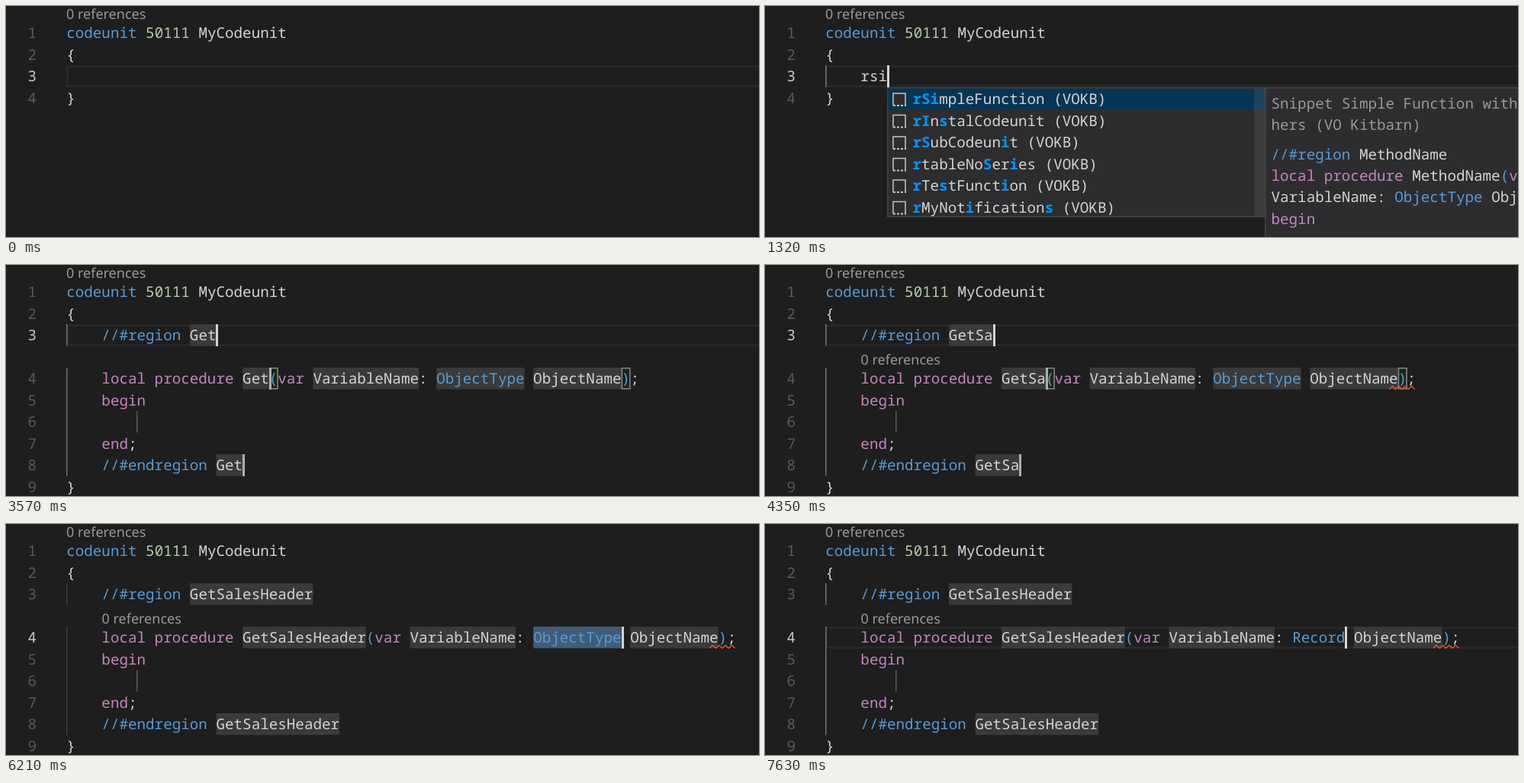
Write an HTML page that moves like this. It is 987 by 304 pixels and loops after 8000 ms.

```html
<!DOCTYPE html>
<html lang="en">
<head>
<meta charset="utf-8">
<title>Snippet typing</title>
<style>
  html, body { margin: 0; width: 100%; height: 100%; overflow: hidden; background: #1e1e1e; }
  svg { display: block; width: 987px; height: 304px; }
  text {
    font: 500 19.24px "Noto Sans Mono", "DejaVu Sans Mono", monospace;
    white-space: pre;
    text-rendering: geometricPrecision;
  }
  .lens { font: 18px "Noto Sans", "Open Sans", sans-serif; }
  .hit { fill: #0097fb; font-weight: 700; }
</style>
</head>
<body>
<svg id="stage" viewBox="0 0 987 304"></svg>
<script>
const LOOP = 8000, LEFT = 79.2, CHAR = 11.546, ROW = 28.5;
const TEXT = '#d4d4d4', BLUE = '#569cd6', PURPLE = '#c586c0', GREEN = '#b5cea8';
const GREY = '#999999', BOX = '#3a3a3a', SELECTED = '#405c79';
const PANEL = '#2d2d30', BORDER = 'stroke="#454545" stroke-width="1.5"';

const snippets = ['rSimpleFunction', 'rInstalCodeunit', 'rSubCodeunit',
  'rtableNoSeries', 'rTestFunction', 'rMyNotifications'];
const types = ['Record', 'RecordId', 'RecordRef', 'Report', 'ReportFormat', 'RequestPage'];

// Each step changes only the listed properties of the editor state.
const steps = [
  [0, { word: '', popup: false, cursor: false, inserted: false, gap: false, lens: false,
        name: 'MethodName', type: 'ObjectType', field: 'name', selected: false }],
  [230, { word: 'r', cursor: true }],
  [320, { popup: true }],
  [780, { word: 'rs' }],
  [1010, { word: 'rsi' }],
  [1380, { word: 'rsim' }],
  [1870, { cursor: false }],
  [2100, { inserted: true, popup: false, selected: true, cursor: true }],
  [2560, { gap: true, cursor: false }],
  [3110, { cursor: true }],
  [3190, { name: 'G', selected: false }],
  [3420, { name: 'Ge' }],
  [3570, { name: 'Get' }],
  [3800, { lens: true }],
  [4120, { name: 'GetS' }],
  [4350, { name: 'GetSa' }],
  [4500, { name: 'GetSal' }],
  [4580, { name: 'GetSale' }],
  [4740, { name: 'GetSales' }],
  [5050, { name: 'GetSalesH' }],
  [5200, { name: 'GetSalesHe' }],
  [5430, { name: 'GetSalesHea' }],
  [5600, { name: 'GetSalesHead' }],
  [5830, { name: 'GetSalesHeade' }],
  [5980, { name: 'GetSalesHeader' }],
  [6210, { field: 'type', selected: true }],
  [6670, { cursor: false }],
  [6990, { type: 'R', selected: false, cursor: true }],
  [7070, { popup: true }],
  [7220, { type: 'Re' }],
  [7370, { type: 'Rec' }],
  [7460, { type: 'Reco' }],
  [7630, { type: 'Record', popup: false }]
];

const colX = col => LEFT + col * CHAR;
const rect = (x, y, w, h, fill, extra = '') =>
  `<rect x="${x}" y="${y}" width="${w}" height="${h}" fill="${fill}" ${extra}/>`;
const text = (x, y, content, fill, cls = '') =>
  `<text x="${x}" y="${y}" fill="${fill}" class="${cls}">${content}</text>`;

function tokens(x, y, list) {
  let col = 0;
  return list.map(([content, fill]) => {
    const out = text(x + col * CHAR, y, content, fill);
    col += content.length;
    return out;
  }).join('');
}

function label(item, query) {
  const hits = new Set([...query.toLowerCase()].map(c => item.toLowerCase().indexOf(c)));
  return [...item].map((c, i) => hits.has(i) ? `<tspan class="hit">${c}</tspan>` : c).join('');
}

function matches(item, query) {
  const rest = [...item.toLowerCase()];
  return [...query.toLowerCase()].every(c => {
    const i = rest.indexOf(c);
    if (i >= 0) rest.splice(i, 1);
    return i >= 0;
  });
}

function suggestList(x, y, width, items, query, suffix) {
  const height = items.length * ROW - 1.5;
  let out = rect(x + .75, y + .75, width, height, PANEL, BORDER);
  out += rect(x + 1.5, y + 1.5, width - 1.5, ROW - 1, '#073655');
  if (items.length > 5) out += rect(x + width - 14, y + 1.5, 14, height - 1.5, 'rgba(121,121,121,.2)');
  items.forEach((item, i) => {
    const top = y + 1 + i * ROW, ix = x + 8, iy = top + 7;
    out += `<path d="M${ix} ${iy + 16}V${iy}H${ix + 16}V${iy + 16}" fill="${PANEL}" stroke="#c5c5c5" stroke-width="1.5"/>`;
    out += `<path d="M${ix} ${iy + 16}h17" stroke="#c5c5c5" stroke-width="2" stroke-dasharray="3 2"/>`;
    out += text(x + 33.5, top + 21, label(item, query) + suffix, TEXT);
  });
  return out;
}

function details(x, y) {
  const lines = [
    [28, [['Snippet Simple Function with ot', GREY]]],
    [56, [['hers (VO Kitbarn)', GREY]]],
    [95, [['//#region ', BLUE], ['MethodName', TEXT]]],
    [123, [['local procedure ', PURPLE], ['MethodName', TEXT], ['(', BLUE], ['var', PURPLE]]],
    [151, [['VariableName: ', TEXT], ['ObjectType ', BLUE], ['ObjectName);', TEXT]]],
    [180, [['begin', PURPLE]]]
  ];
  return rect(x + .75, y + .75, 370, 230, PANEL, BORDER) +
    lines.map(([dy, list]) => tokens(x + 8.5, y + dy, list)).join('');
}

function squiggle(x, y) {
  let d = `M${x} ${y}`;
  for (let i = 1; i <= 8; i++) d += `L${x + i * 4.2} ${y - (i % 2) * 4}`;
  return `<path d="${d}" fill="none" stroke="#e2533f" stroke-width="1.5" stroke-linejoin="round"/>`;
}

function codeLines(s) {
  const head = [
    [['codeunit', BLUE], [' ', TEXT], ['50111', GREEN], [' MyCodeunit', TEXT]],
    [['{', TEXT]]
  ];
  if (!s.inserted) return [...head, [['    ' + s.word, TEXT]], [['}', TEXT]]];
  return [...head,
    [['    //#region ', BLUE], [s.name, TEXT]],
    [['    local procedure ', PURPLE], [s.name, TEXT], ['(', BLUE], ['var ', PURPLE],
      ['VariableName: ', TEXT], [s.type, BLUE], [' ObjectName', TEXT], [')', BLUE], [';', TEXT]],
    [['    begin', PURPLE]],
    [],
    [['    end', PURPLE], [';', TEXT]],
    [['    //#endregion ', BLUE], [s.name, TEXT]],
    [['}', TEXT]]
  ];
}

function draw(s) {
  const top = row => 21 + ROW * (row + (s.gap && row >= 3 ? 1 : 0));
  const bar = (row, col, fill) => rect(Math.round(colX(col)), Math.round(top(row)), 3, 29, fill);
  const box = (row, col, len, fill) =>
    rect(colX(col), Math.round(top(row)), len * CHAR, 28.5, fill, 'rx="1.5"');
  const onName = s.field === 'name';
  const active = onName ? 2 : 3;
  const paren = 20 + s.name.length;
  const typeCol = paren + 19;
  const typeEnd = typeCol + s.type.length;
  const close = typeEnd + 11;
  const nameSpots = [[2, 14], [3, 20], [7, 17]];
  const guide = s.selected ? '#404040' : '#707070';
  let out = rect(0, 0, 987, 304, '#1e1e1e');

  if (!s.selected)
    out += rect(80.5, top(active) + 1.5, 920, 26, 'none', 'stroke="#282828" stroke-width="3"');
  if (s.inserted || s.word) out += rect(79, 78, 1.5, ROW, guide);

  if (s.inserted) {
    out += rect(79, top(3), 1.5, 5 * ROW, guide);
    out += rect(171, top(5), 1.5, ROW, '#5a5a5a');
    for (const [row, col] of nameSpots)
      out += box(row, col, s.name.length, onName && s.selected ? SELECTED : BOX);
    out += box(3, paren + 5, 12, BOX) + box(3, typeEnd + 1, 10, BOX);
    if (onName || s.selected) out += box(3, typeCol, s.type.length, onName ? BOX : SELECTED);
    if (onName && !s.selected)
      for (const col of [paren, close])
        out += rect(colX(col) + .75, top(3) + .75, CHAR - 1, 27, 'rgba(0,100,0,.1)',
          'stroke="#888" stroke-width="1.5"');
  }

  out += text(79, 17, '0 references', GREY, 'lens');
  if (s.lens) out += text(125.5, 131, '0 references', GREY, 'lens');

  codeLines(s).forEach((line, row) => {
    const y = top(row) + 21;
    out += text(28.5, y, row + 1, row === active ? '#c6c6c6' : '#5a5a5a');
    out += tokens(LEFT, y, line);
  });

  if (s.lens) out += squiggle(colX(close - 1), 163.5);

  if (s.cursor) {
    if (!s.inserted) out += bar(2, 4 + s.word.length, TEXT);
    else if (onName) for (const [row, col] of nameSpots)
      out += bar(row, col + s.name.length, row === 2 ? TEXT : '#aeafad');
    else out += bar(3, typeEnd, TEXT);
  }

  if (s.popup) {
    const query = s.inserted ? s.type : s.word;
    const x = Math.round(colX(s.inserted ? typeEnd : 4 + s.word.length));
    const items = (s.inserted ? types : snippets).filter(item => matches(item, query));
    out += s.inserted
      ? suggestList(x, 164, 238, items, query, '')
      : details(x + 495, 107) + suggestList(x, 107, 495, items, query, ' (VOKB)');
  }
  return out;
}

const stage = document.getElementById('stage');
const start = performance.now();
let shown = -1;

function tick() {
  const time = (performance.now() - start) % LOOP;
  const index = steps.filter(([at]) => at <= time).length - 1;
  if (index !== shown) {
    shown = index;
    stage.innerHTML = draw(Object.assign({}, ...steps.slice(0, index + 1).map(step => step[1])));
  }
  requestAnimationFrame(tick);
}
tick();
</script>
</body>
</html>
```
